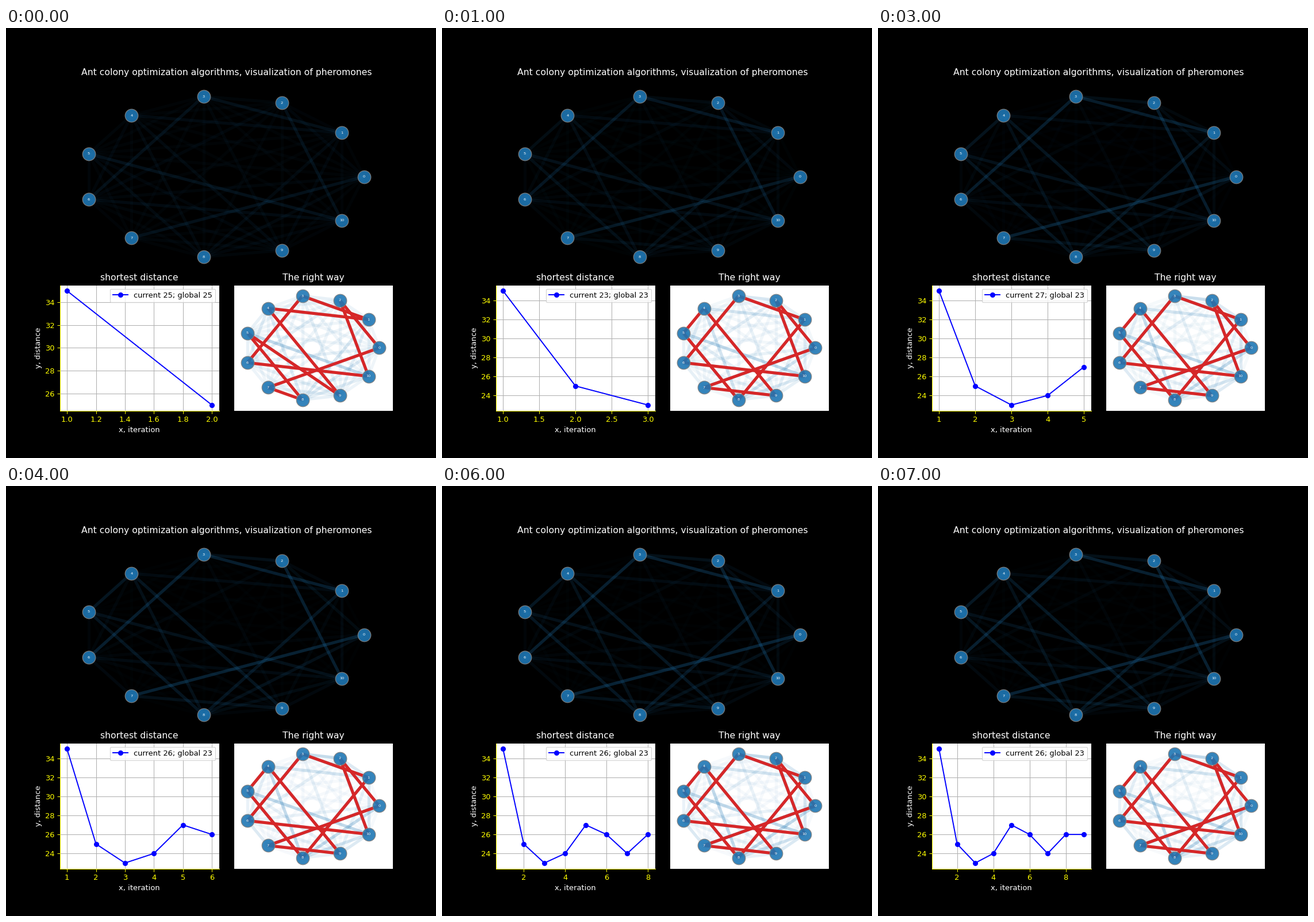
These frames come from a looping animation (748x748 px, 8000 ms). A matplotlib script:

```python
from itertools import combinations

import matplotlib.pyplot as plt
import numpy as np
from matplotlib.animation import FuncAnimation
from matplotlib.collections import LineCollection
from matplotlib.colors import to_rgba

N = 11
FRAMES = 8
BLUE, RED = "tab:blue", "tab:red"
WAY_GAIN = 2  # trails are stronger on the white panel

DISTANCES = [35, 25, 23, 24, 27, 26, 24, 26, 26]
FIRST_TOUR = [3, 1, 4, 9, 5, 8, 7, 0, 2, 10, 6]
BEST_TOUR = [3, 1, 8, 5, 4, 9, 7, 0, 2, 10, 6]

# (initial, settled) pheromone level -> edges; all others just evaporate
FADING = (0.035, 0.018)
LEVELS = {
    (0.14, 0.30): "0-7",
    (0.13, 0.27): "3-6 1-3 2-10",
    (0.14, 0.14): "5-10",
    (0.08, 0.19): "1-8 5-8 4-9",
    (0.05, 0.20): "4-5",
    (0.05, 0.14): "2-3 7-9",
    (0.07, 0.14): "0-8 4-8",
    (0.06, 0.10): "0-2 8-10",
    (0.09, 0.09): "6-10 1-4",
    (0.04, 0.08): "9-10 1-10 6-7 1-2",
    (0.06, 0.05): "5-9 4-6 2-6 1-9",
    (0.05, 0.045): "0-6 3-9 6-9 8-9 5-6",
}

angles = 2 * np.pi * np.arange(N) / N
POS = np.column_stack([np.cos(angles), np.sin(angles)])
EDGES = list(combinations(range(N), 2))
RANGES = {
    tuple(map(int, name.split("-"))): levels
    for levels, names in LEVELS.items()
    for name in names.split()
}


def pheromone_colors(step, gain=1):
    """Each edge eases from its initial level to its settled one."""
    progress = 1 - np.exp(-step / 2)
    colors = []
    for edge in EDGES:
        start, end = RANGES.get(edge, FADING)
        colors.append(to_rgba(BLUE, gain * (start + (end - start) * progress)))
    return colors


def tour_segments(tour):
    return [POS[[a, b]] for a, b in zip(tour, tour[1:] + tour[:1])]


def add_lines(ax, segments, color):
    lines = LineCollection(segments, linewidths=4, colors=color, zorder=1)
    return ax.add_collection(lines, autolim=False)


def draw_graph(ax):
    """Draw nodes and labels, and return the pheromone edges."""
    low, high = POS.min(axis=0), POS.max(axis=0)
    pad = (high - low) * 0.105
    ax.set_xlim(low[0] - pad[0], high[0] + pad[0])
    ax.set_ylim(low[1] - pad[1], high[1] + pad[1])
    ax.set_xticks([])
    ax.set_yticks([])
    trails = add_lines(ax, [POS[list(e)] for e in EDGES], BLUE)
    ax.scatter(*POS.T, s=300, c=BLUE, edgecolors="gray", linewidths=1,
               alpha=0.9, zorder=2)
    for i, (x, y) in enumerate(POS):
        ax.text(x, y, str(i), color="white", size=5,
                ha="center", va="center", zorder=3)
    return trails


fig = plt.figure(figsize=(8, 8), dpi=93.5, facecolor="black")
grid = fig.add_gridspec(5, 4)

top = fig.add_subplot(grid[:3, :], facecolor="black")
top.set_title("Ant colony optimization algorithms, visualization of pheromones",
              color="white")
top_trails = draw_graph(top)

chart = fig.add_subplot(grid[3:, :2])
chart.set_title("shortest distance", color="white")
chart.set_xlabel("x, iteration", color="white")
chart.set_ylabel("y, distance", color="white")
chart.tick_params(colors="yellow", grid_color="#b0b0b0")
for side in ("left", "bottom"):
    chart.spines[side].set_color("yellow")
chart.grid(True)
curve, = chart.plot([], [], "bo-", label="current")
legend = chart.legend(loc="upper right")

way = fig.add_subplot(grid[3:, 2:])
way.set_title("The right way", color="white")
way_trails = draw_graph(way)
tour_lines = add_lines(way, [], RED)


def update(step):
    top_trails.set_color(pheromone_colors(step))
    way_trails.set_color(pheromone_colors(step, WAY_GAIN))
    tour_lines.set_segments(tour_segments(BEST_TOUR if step else FIRST_TOUR))

    seen = DISTANCES[:step + 2]
    curve.set_data(range(1, len(seen) + 1), seen)
    chart.relim()
    chart.autoscale_view()
    legend.get_texts()[0].set_text(f"current {seen[-1]}; global {min(seen)}")
    return top_trails, way_trails, tour_lines, curve, legend


anim = FuncAnimation(fig, update, frames=FRAMES, interval=1000,
                     repeat=True, repeat_delay=0, blit=False)
plt.show()
```
